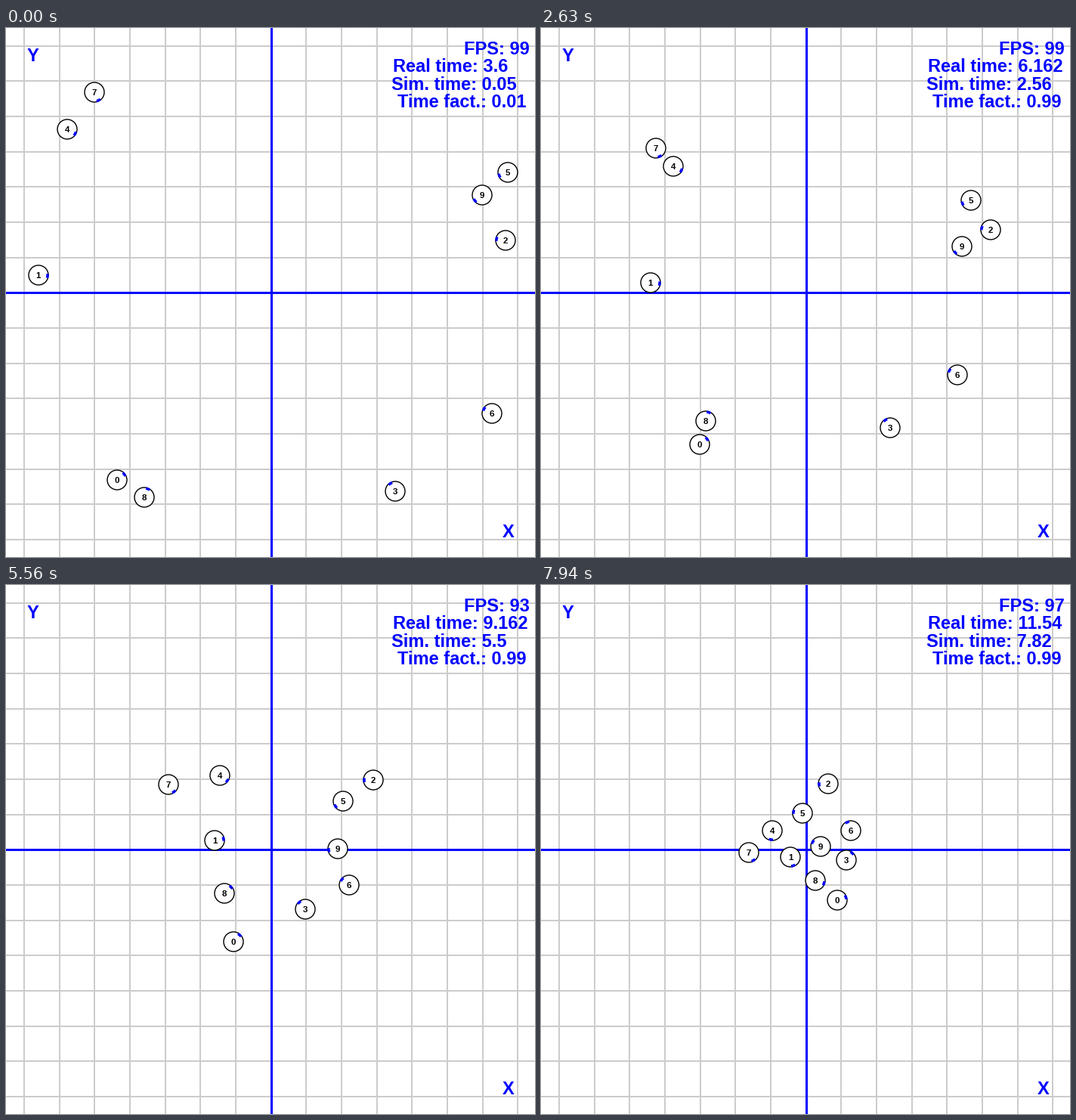
Write a matplotlib script that moves like this. It is 700x700 px and loops after 8000 ms.

```python
import numpy as np
import matplotlib.pyplot as plt
from matplotlib.animation import FuncAnimation
from matplotlib.patches import Circle

SIZE, DPI = 700, 100
LOOP, INTERVAL = 8000, 40
STEP = 62.5                      # the simulation view refreshes every 62.5 ms
STEPS = int(LOOP / STEP)
RADIUS = 13
BLUE, GRID = "#0000ff", "#cccccc"
PT = 72 / DPI                    # points per pixel

# Robots 0-9 as x + yj: start, end of the straight run, swerve, finish
KNOTS = np.array([0, 75, 111, 127])
PATHS = np.array([
    [147+598j, 274+500j, 349+432j, 392+417j],
    [43+327j, 238+343j, 322+338j, 330+360j],
    [661+281j, 523+258j, 425+260j, 380+263j],
    [515+613j, 416+454j, 381+392j, 404+364j],
    [81+134j, 255+232j, 311+288j, 306+325j],
    [664+191j, 479+265j, 392+309j, 346+302j],
    [643+510j, 474+412j, 428+366j, 410+325j],
    [117+85j, 192+232j, 252+315j, 275+354j],
    [183+621j, 262+436j, 334+382j, 363+391j],
    [630+221j, 480+340j, 383+353j, 370+346j]])


def warp(step, ramp=12):
    """Steps of full-speed travel: the robots accelerate at the start."""
    return np.where(step < ramp, step**2 / (2 * ramp), step - ramp / 2)


def smooth(x, knots, values):
    """Cubic Hermite curve through the knots."""
    slope = np.gradient(values, knots)
    i = np.clip(np.searchsorted(knots, x, side="right") - 1, 0, len(knots) - 2)
    h = knots[i + 1] - knots[i]
    u = (x - knots[i]) / h
    return ((1 + 2 * u) * (1 - u)**2 * values[i] + u * (1 - u)**2 * h * slope[i]
            + u**2 * (3 - 2 * u) * values[i + 1] + u**2 * (u - 1) * h * slope[i + 1])


steps = np.arange(STEPS)
places = np.array([smooth(warp(steps), warp(KNOTS), p) for p in PATHS])
heading = np.angle(np.gradient(places, axis=1))

rng = np.random.default_rng(4)
real_time = 3.6 + steps * STEP / 1000
sim_time = np.round(0.05 + 0.979 * steps * STEP / 1000, 2)
fps = np.where(steps < 79, rng.integers(97, 101, STEPS), rng.integers(92, 100, STEPS))
factor = np.where(steps == 0, 0.01, rng.choice([0.98, 0.99], STEPS, p=[0.2, 0.8]))

plt.rcParams["font.family"] = "Liberation Sans"
fig = plt.figure(figsize=(SIZE / DPI, SIZE / DPI), dpi=DPI, facecolor="white")
ax = fig.add_axes([0, 0, 1, 1])
ax.set(xlim=(0, SIZE), ylim=(SIZE, 0))
ax.axis("off")


def rule(pos, vertical, width, color, z):
    draw = ax.axvspan if vertical else ax.axhspan
    draw(pos - width / 2, pos + width / 2, color=color, lw=0, zorder=z,
         antialiased=False)


def label(x, y, text="", size=23.6, color=BLUE, **kw):
    return ax.text(x, y, text, fontsize=size * PT, weight="bold", color=color,
                   va="baseline", **kw)


for k in range(-7, 8):
    if k:
        pos = SIZE / 2 + k * SIZE / 15
        rule(np.floor(pos + 1e-6) + 1, True, 2, GRID, 1)
        rule(np.ceil(pos - 1e-6), False, 2, GRID, 1)
rule(351.5, True, 3, BLUE, 2)
rule(350.5, False, 3, BLUE, 2)
label(28, 44.5, "Y")
label(657, 674, "X")

readouts = [label(x, 35 + 23.3 * row, zorder=9)
            for row, x in enumerate((606, 511.5, 509.5, 517.5))]

robots = []
for n in range(len(PATHS)):
    z = 3 + n / 10
    body = ax.add_patch(Circle((0, 0), RADIUS, fc="white", ec="black",
                               lw=1.4 * PT, zorder=z))
    nose, = ax.plot([], [], color=BLUE, lw=3.4 * PT, zorder=z + 0.02,
                    solid_capstyle="butt")
    digit = label(0, 0, str(n), 11.5, "black", ha="center", zorder=z + 0.04)
    robots.append((body, nose, digit))


def update(frame):
    s = int((frame + 0.5) * INTERVAL / STEP)
    for n, (body, nose, digit) in enumerate(robots):
        x, y = round(places[n, s].real), round(places[n, s].imag)
        arc = heading[n, s] + np.linspace(-0.23, 0.23, 5)
        body.center = x, y
        nose.set_data(x + 12 * np.cos(arc), y + 12 * np.sin(arc))
        digit.set_position((x, y + 4))
    lines = (f"FPS: {fps[s]}", f"Real time: {real_time[s]:.4g}",
             f"Sim. time: {sim_time[s]:.4g}", f"Time fact.: {factor[s]:.2f}")
    for item, text in zip(readouts, lines):
        item.set_text(text)
    return readouts


anim = FuncAnimation(fig, update, frames=LOOP // INTERVAL, interval=INTERVAL,
                     init_func=lambda: update(0), repeat=True, repeat_delay=0)
plt.show()
```
